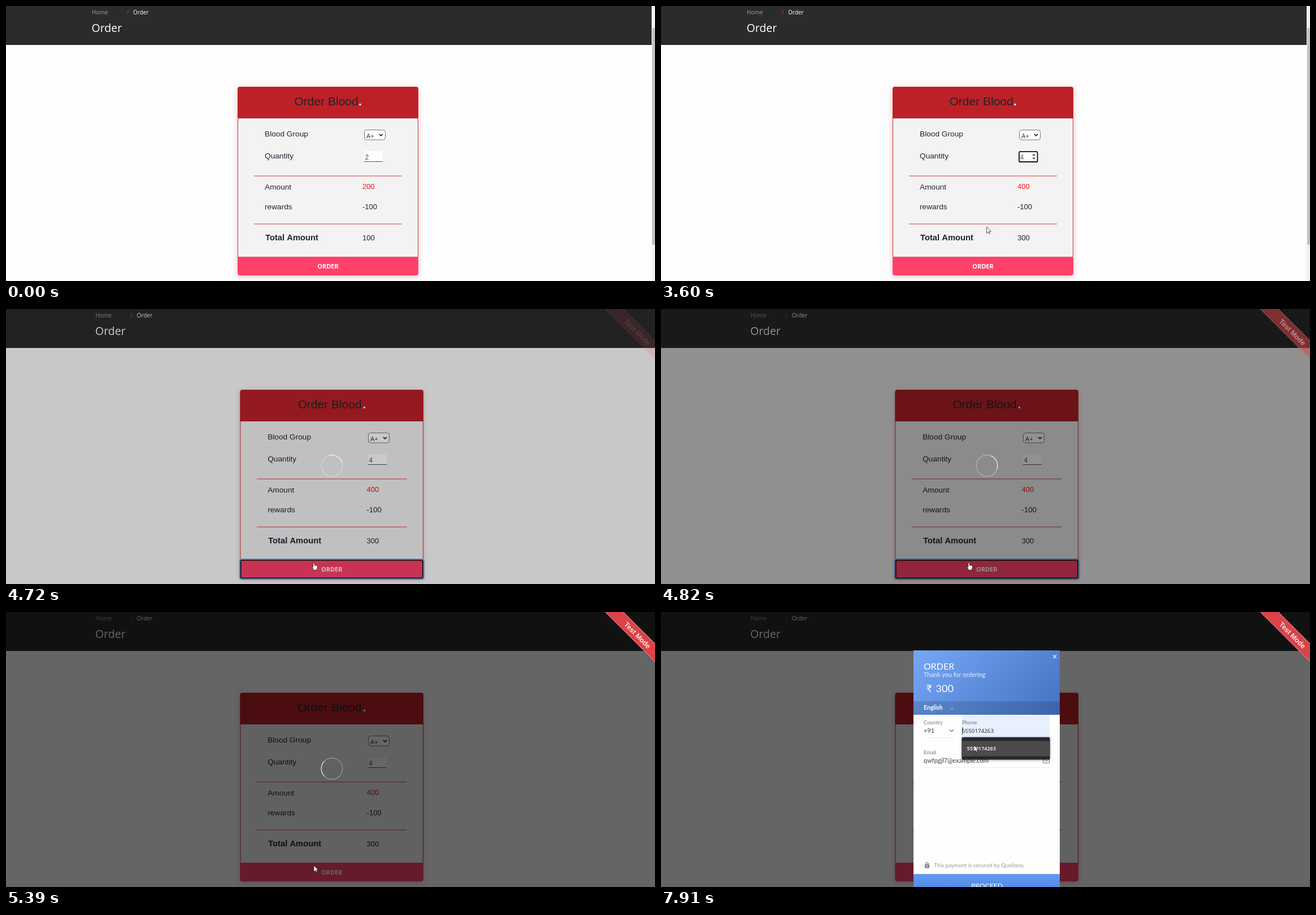
These frames come from a looping animation (1149x487 px, 8000 ms). An HTML page with a canvas:

```html
<!DOCTYPE html>
<html lang="en">
<head>
<meta charset="utf-8">
<title>Order Blood</title>
<style>
  html, body { margin: 0; width: 100%; height: 100%; overflow: hidden; background: #fdfdfd; }
  canvas { display: block; }
</style>
</head>
<body>
<canvas id="stage" width="1149" height="487"></canvas>
<script>
const c = document.getElementById('stage').getContext('2d');
const W = 1149, H = 487, LOOP = 8000;
const ARIAL = '"Liberation Sans", Arial, sans-serif';
const OPEN = '"Open Sans", sans-serif';
const LATO = 'Lato, sans-serif';
const PHONE = '5550174263';

// Pointer path: time, x, y
const PATH = [
  [80, 947, 446], [880, 716, 296], [990, 714, 294], [1650, 646, 268], [1820, 646, 268], [2010, 644, 268],
  [3140, 644, 268], [3880, 545, 449], [5390, 545, 449], [5800, 553, 249], [5860, 553, 249],
  [6140, 554, 230], [6850, 554, 230], [7170, 547, 213], [7500, 547, 213], [7900, 554, 236], [8000, 554, 236]
];

const clamp = u => Math.max(0, Math.min(1, u));
const smooth = u => { u = clamp(u); return u * u * (3 - 2 * u); };
const easeOutBack = u => 1 + 2.7 * (u - 1) ** 3 + 1.7 * (u - 1) ** 2;

function rect(x, y, w, h, fill) {
  c.fillStyle = fill;
  c.fillRect(x, y, w, h);
}
function round(x, y, w, h, r, fill, stroke, width = 1) {
  c.beginPath();
  c.roundRect(x, y, w, h, r);
  if (fill) { c.fillStyle = fill; c.fill(); }
  if (stroke) { c.strokeStyle = stroke; c.lineWidth = width; c.stroke(); }
}
function text(s, x, y, font, fill, align = 'left') {
  c.font = font;
  c.fillStyle = fill;
  c.textAlign = align;
  c.fillText(s, x, y);
}
function line(points, stroke, width = 1) {
  c.beginPath();
  points.forEach(([x, y]) => c.lineTo(x, y));
  c.strokeStyle = stroke;
  c.lineWidth = width;
  c.stroke();
}
function polygon(points, fill) {
  c.beginPath();
  points.forEach(([x, y]) => c.lineTo(x, y));
  c.closePath();
  c.fillStyle = fill;
  c.fill();
}
const chevron = (x, y, r, color, width) => line([[x - r, y - r / 2], [x, y + r / 2], [x + r, y - r / 2]], color, width);

function pointer(t) {
  let i = 1;
  while (i < PATH.length - 1 && PATH[i][0] < t) i++;
  const [t0, x0, y0] = PATH[i - 1], [t1, x1, y1] = PATH[i];
  const u = smooth((t - t0) / (t1 - t0));
  return [x0 + (x1 - x0) * u, y0 + (y1 - y0) * u];
}

function drawPage(t, pos) {
  const locked = t >= 4530;             // scrollbar removed, layout widens
  const X = x => locked ? 414.5 + (x - 410) * 1.014 : x;
  const nav = locked ? 6.5 : 0;
  const count = t < 2390 ? 2 : t < 2660 ? 3 : 4;

  rect(0, 0, W, H, '#fdfdfd');
  rect(0, 0, W, 69, '#2b2b2d');
  text('Home', 152 + nav, 14.5, '10px ' + OPEN, '#a0a0a2');
  text('/', 213.5 + nav, 14.5, '11px ' + OPEN, '#dc2f35');
  text('Order', 225 + nav, 14.5, '10px ' + OPEN, '#fff');
  text('Order', 151.5 + nav, 46, '19.5px ' + OPEN, '#fff');
  if (!locked) {
    rect(1143, 0, 6, H, '#f1f1f1');
    rect(1144, 39, 5, 384, '#c1c1c1');
  }

  const left = X(410), width = X(730) - left, mid = left + width / 2;
  c.save();
  c.shadowColor = 'rgba(190,30,40,.28)';
  c.shadowBlur = 10;
  c.shadowOffsetY = 2;
  round(left, 143, width, 334, 4, '#f3f3f3');
  c.restore();
  round(left + .5, 143.5, width - 1, 330, 4, '#f3f3f3', '#d0383d');
  round(left, 143, width, 56, [4, 4, 0, 0], '#bc2128');
  text('Order Blood', X(510.5), 176, '21px ' + ARIAL, '#212529');
  text('.', X(624), 176, 'bold 21px ' + ARIAL, '#fff');

  const label = '13.7px ' + ARIAL, value = '13px ' + ARIAL, ink = '#212433';
  text('Blood Group', X(458), 231, label, ink);
  text('Quantity', X(458), 270, label, ink);
  text('Amount', X(458), 325, label, ink);
  text('rewards', X(458), 360, label, ink);
  text('Total Amount', X(459), 415, 'bold 14.75px ' + ARIAL, ink);
  text(count * 100, X(631), 324, value, '#f5151b');
  text('-100', X(631), 359.5, value, '#212529');
  text(count * 100 - 100, X(631), 415, value, '#212529');
  for (const y of [301, 386]) rect(X(439), y - .5, X(701) - X(439), 1, '#e5383d');

  const field = Math.round(X(634) - .4);
  round(field + .5, 219.5, 37, 17.5, 4, '#fff', '#767676');
  text('A+', field + 4, 233.5, '11.5px ' + OPEN, '#333');
  chevron(field + 30, 228.3, 3, '#222', 1.7);

  const focused = t >= 1820 && t < 3880;
  const hover = pos[0] > 633 && pos[0] < 667 && pos[1] > 257 && pos[1] < 277;
  rect(field, 257, 33, 19, '#fff');
  rect(field, 275, 33, 1, '#555');
  text(count, field + 1.5, 272, '12px ' + ARIAL, '#495057');
  if (focused) {
    round(field, 257.8, 32.5, 18.4, 2, null, '#101010', 1.8);
    if (t < 3140) rect(642, 262, 1, 11, '#333');
  }
  if (focused || hover && !locked) {
    const x = field + 26;
    polygon([[x - 3, 265], [x, 261.5], [x + 3, 265]], '#555');
    polygon([[x - 3, 268.5], [x, 272], [x + 3, 268.5]], '#555');
  }

  round(left, 444, width, 33, [0, 0, 4, 4], '#ff4069');
  if (t >= 3880 && t < 5390) {
    round(left - .5, 443.2, width + 1, 35, 3, null, '#70acf7', 2.6);
    if (t >= 4080) round(left + 1.2, 445, width - 2.4, 31.5, 2, null, '#101010', 1.6);
  }
  text('ORDER', mid, 464.8, 'bold 11px ' + OPEN, '#fff', 'center');
}

function drawRibbon(alpha) {
  c.save();
  c.globalAlpha = alpha;
  c.translate(1118, 41);
  c.rotate(Math.PI / 4);
  rect(-90, -11.8, 180, 23.6, '#da4347');
  c.setLineDash([2, 2]);
  for (const y of [-11, 11]) line([[-90, y], [90, y]], 'rgba(255,255,255,.6)', 1);
  text('Test Mode', 0, 4.5, 'bold 12.4px ' + ARIAL, '#fbe6e6', 'center');
  c.restore();
}

function drawSpinner(t, alpha) {
  const angle = -Math.PI / 2 + (t - 4640) / 1000 * Math.PI * 2;
  c.save();
  c.globalAlpha = alpha;
  c.lineWidth = 1.2;
  for (const [from, to, color] of [[0, 2 * Math.PI, 'rgba(255,255,255,.35)'],
    [angle - Math.PI / 4, angle + Math.PI / 4, 'rgba(255,255,255,.75)']]) {
    c.beginPath();
    c.arc(577, 277.5, 18.8, from, to);
    c.strokeStyle = color;
    c.stroke();
  }
  c.restore();
}

function drawPhoneIcon(x, y) {
  c.save();
  c.translate(x, y);
  c.strokeStyle = '#777';
  c.lineWidth = 1;
  c.beginPath();
  c.moveTo(-4.5, -4);
  c.lineTo(-2.5, -5.5);
  c.lineTo(-.5, -2.5);
  c.lineTo(-1.7, -1);
  c.quadraticCurveTo(-.5, 1.2, 1.5, 2);
  c.lineTo(2.7, 1);
  c.lineTo(5, 3);
  c.lineTo(3.6, 5);
  c.quadraticCurveTo(-4, 4, -4.5, -4);
  c.stroke();
  c.restore();
}

function drawModal(t) {
  const u = clamp((t - 5390) / 360);
  if (u <= 0) return;
  const scale = .9 + .1 * easeOutBack(u);
  c.save();
  c.globalAlpha = smooth(u * 1.4);
  c.translate(576.5, 277);
  c.scale(scale, scale);
  c.translate(-576.5, -277);

  const blue = c.createLinearGradient(490, 40, 663, 210);
  blue.addColorStop(0, '#74a5f4');
  blue.addColorStop(1, '#4674c3');
  round(447, 68, 259, 430, 2, '#fefefe');
  round(447, 68, 259, 114, [2, 2, 0, 0], blue);
  rect(447, 158, 259, 24, 'rgba(0,0,0,.13)');
  line([[694, 76], [700, 82]], '#e6eefc', 1.2);
  line([[700, 76], [694, 82]], '#e6eefc', 1.2);
  text('ORDER', 465, 101.5, '16px ' + LATO, '#fff');
  text('Thank you for ordering', 465, 114.5, '10.9px ' + LATO, '#e8effc');
  text('₹', 469.5, 142, '18px ' + LATO, '#fff');
  text('300', 486.5, 142, '18px ' + LATO, '#fff');
  text('English', 465, 173, 'bold 10.6px ' + LATO, '#fff');
  chevron(515, 171, 2.6, '#e6eefc', 1);

  const filled = t >= 7700;
  const small = '9.4px ' + LATO, entry = '11px ' + LATO;
  if (filled) rect(533, 182, 155, 40, '#e8f0fe');
  text('Country', 465, 199, small, '#777');
  text('+91', 465, 214, entry, '#444');
  chevron(514.5, 210, 3.6, '#777', 1.3);
  rect(465, 222, 54, 1, '#ececec');
  text('Phone', 533, 199, small, '#777');
  rect(533, 221.5, 155, 1.2, '#4d80d2');
  if (filled) text(PHONE, 533, 214, '9.8px ' + OPEN, '#222');
  else drawPhoneIcon(683, 209);
  if (t >= 6320 && t < 6890 || t >= 7340) rect(533, 204, 1, 13, '#333');

  text('Email', 465, 252, small, '#777');
  text('qwfpgjl7@example.com', 465, 267, entry, '#444');
  round(676.5, 259.5, 11, 8, 1.5, null, '#777');
  line([[677, 260.5], [682, 264.5], [687, 260.5]], '#777');
  rect(465, 275, 223, 1, '#ececec');

  round(467, 446.5, 8, 7, 1, '#858585');
  c.beginPath();
  c.arc(471, 446, 2.3, Math.PI, 0);
  c.strokeStyle = '#858585';
  c.lineWidth = 1.2;
  c.stroke();
  rect(470.3, 449, 1.5, 2, '#fff');
  text('This payment is secured by Quellano.', 483, 452, '9.9px ' + LATO, '#999');
  const button = c.createLinearGradient(0, 464, 0, 500);
  button.addColorStop(0, '#619af0');
  button.addColorStop(1, '#4d86df');
  rect(447, 464, 259, 34, button);
  text('PROCEED', 577, 489, '12.2px ' + LATO, '#fff', 'center');

  if (t >= 7340) {
    c.save();
    c.shadowColor = 'rgba(0,0,0,.35)';
    c.shadowBlur = 4;
    c.shadowOffsetY = 1;
    round(532.5, 222, 156, 39.5, 2, '#28282a');
    c.restore();
    if (filled) rect(532.5, 228.5, 156, 27, '#4b4b4d');
    text(PHONE, 541.5, 245.3, '600 9px ' + OPEN, '#fff');
  }
  c.restore();
}

function drawCursor(t, [x, y]) {
  const inField = t < 3880 ? x > 633 && x < 667 && y > 257 && y < 277
    : t >= 5390 && y < 262 && !(t >= 7340 && y > 222);
  const onButton = t > 3140 && t < 5390 && y > 444;
  c.save();
  c.translate(x, y);
  if (inField) {
    line([[0, -5], [0, 5]], '#333', 1.2);
    for (const s of [-5, 5]) line([[-2.5, s], [2.5, s]], '#333', 1);
  } else if (onButton) {
    c.beginPath();
    c.moveTo(-1.2, 8);
    c.lineTo(-1.2, .8);
    c.quadraticCurveTo(0, -.8, 1.2, .8);
    c.lineTo(1.2, 4.5);
    c.lineTo(5.5, 5.4);
    c.quadraticCurveTo(7, 6, 6.4, 9);
    c.lineTo(5, 13.5);
    c.lineTo(.2, 13.5);
    c.lineTo(-3, 9);
    c.quadraticCurveTo(-3.4, 7, -1.2, 8);
    c.closePath();
    c.fillStyle = '#fff';
    c.fill();
    c.strokeStyle = '#222';
    c.lineWidth = .9;
    c.stroke();
  } else {
    const arrow = [[0, 0], [0, 11], [2.6, 8.7], [4.3, 12.3], [6, 11.5], [4.4, 8], [7.8, 7.8]];
    polygon(arrow, '#fff');
    line([...arrow, [0, 0]], '#222', .8);
  }
  c.restore();
}

function draw(t) {
  const pos = pointer(t);
  drawPage(t, pos);
  const dim = smooth((t - 4560) / 400);
  if (dim > 0) {
    rect(0, 0, W, H, `rgba(0,0,0,${.6 * dim})`);
    drawRibbon(dim * dim);
    const fade = 1 - clamp((t - 5390) / 200);
    if (fade > 0) drawSpinner(t, fade * Math.min(1, dim * 4));
  }
  drawModal(t);
  if (t >= 80) drawCursor(t, pos);
}

function tick() {
  draw(performance.now() % LOOP);
  requestAnimationFrame(tick);
}
tick();
</script>
</body>
</html>
```
